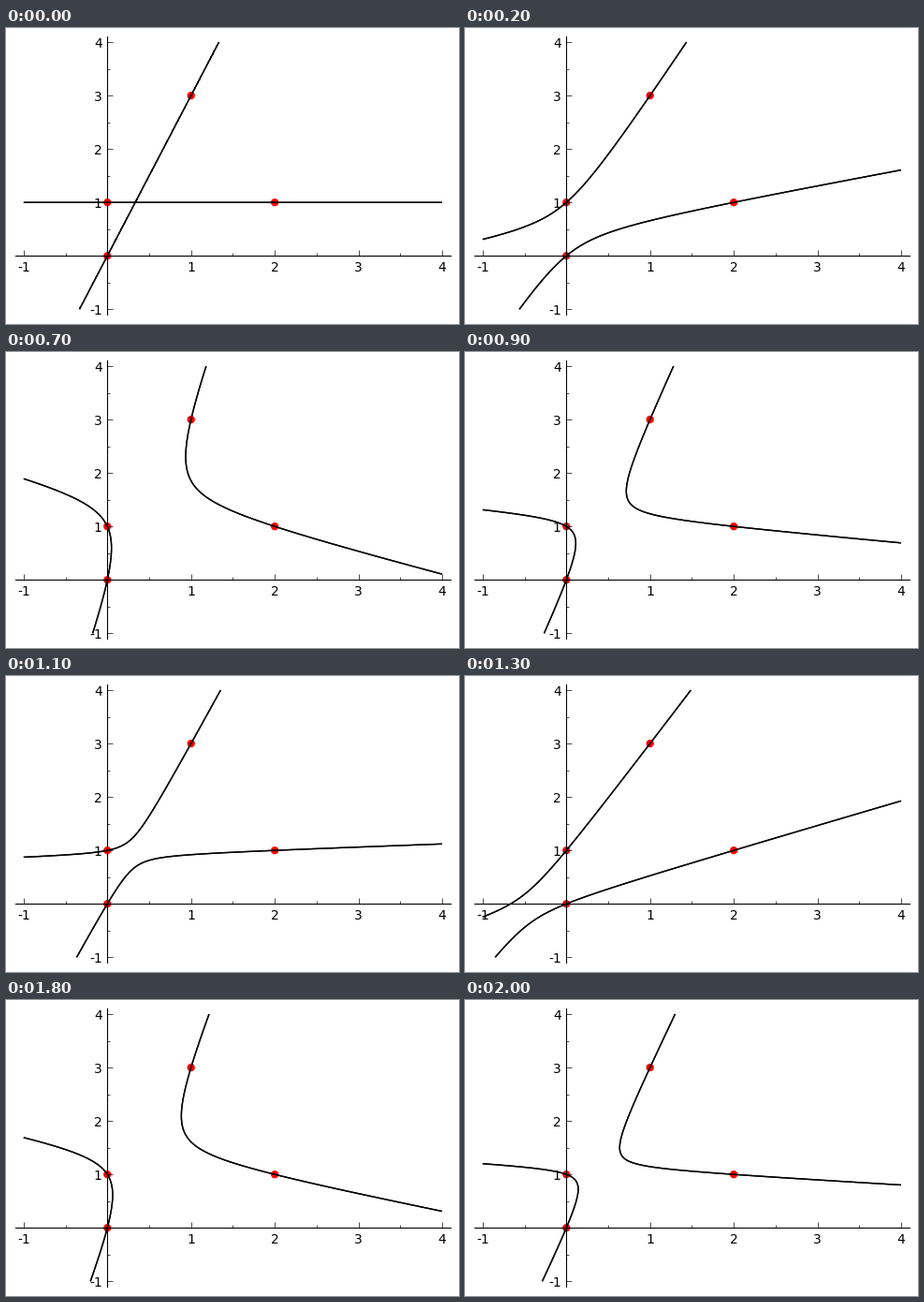
Recreate the animation shown at these times as a matplotlib script. Size 484 by 316 pixels, loop 2.1 s.

```python
import numpy as np
import matplotlib.pyplot as plt
from matplotlib.animation import FuncAnimation
from matplotlib.ticker import FixedLocator, FixedFormatter

W, H, DPI = 484, 316, 100
FRAMES, INTERVAL, STEP = 21, 100, 0.3
LEFT, BOTTOM, AX_W, AX_H = 9.9, 10.0, 465.0, 296.66
LIMITS = (-1.1, 4.1)

plt.rcParams["font.family"] = "DejaVu Sans"
plt.rcParams["font.size"] = 10

fig = plt.figure(figsize=(W / DPI, H / DPI), dpi=DPI, facecolor="white")
ax = fig.add_axes([LEFT / W, BOTTOM / H, AX_W / W, AX_H / H])
ax.patch.set_visible(False)

# Axes crossing at the origin, ticks pointing inwards
for side in ("top", "right"):
    ax.spines[side].set_visible(False)
for side in ("left", "bottom"):
    ax.spines[side].set_position("zero")
    ax.spines[side].set_linewidth(0.8)

major = [-1, 1, 2, 3, 4]
for axis in (ax.xaxis, ax.yaxis):
    axis.set_major_locator(FixedLocator(major))
    axis.set_major_formatter(FixedFormatter([str(v) for v in major]))
    axis.set_minor_locator(FixedLocator(np.arange(-0.5, 4, 1)))
ax.tick_params(which="major", direction="in", length=4, width=0.5, pad=4)
ax.tick_params(which="minor", direction="in", length=2, width=0.5)

# The four base points shared by every conic
ax.scatter([0, 0, 1, 2], [0, 1, 3, 1], s=36, c="red", edgecolors="none",
           zorder=1)

grid = np.linspace(-1, 4, 601)
X, Y = np.meshgrid(grid, grid)
PAIR_A = (Y - 1) * (Y - 3 * X)
PAIR_B = X * (2 * X + Y - 5)
curves = []


def draw(k):
    """Conic of the pencil 2 cos(t) A + sin(t) B = 0."""
    while curves:
        curves.pop().remove()
    t = STEP * k
    Z = 2 * np.cos(t) * PAIR_A + np.sin(t) * PAIR_B
    # Two passes harden the antialiased edge
    for _ in range(2):
        curves.append(ax.contour(X, Y, Z, levels=[0], colors="black",
                                 linewidths=1, linestyles="solid", zorder=2))
    ax.set(xlim=LIMITS, ylim=LIMITS)
    return []


anim = FuncAnimation(fig, draw, frames=FRAMES, interval=INTERVAL,
                     init_func=lambda: draw(0), repeat=True, repeat_delay=0)
plt.show()
```
